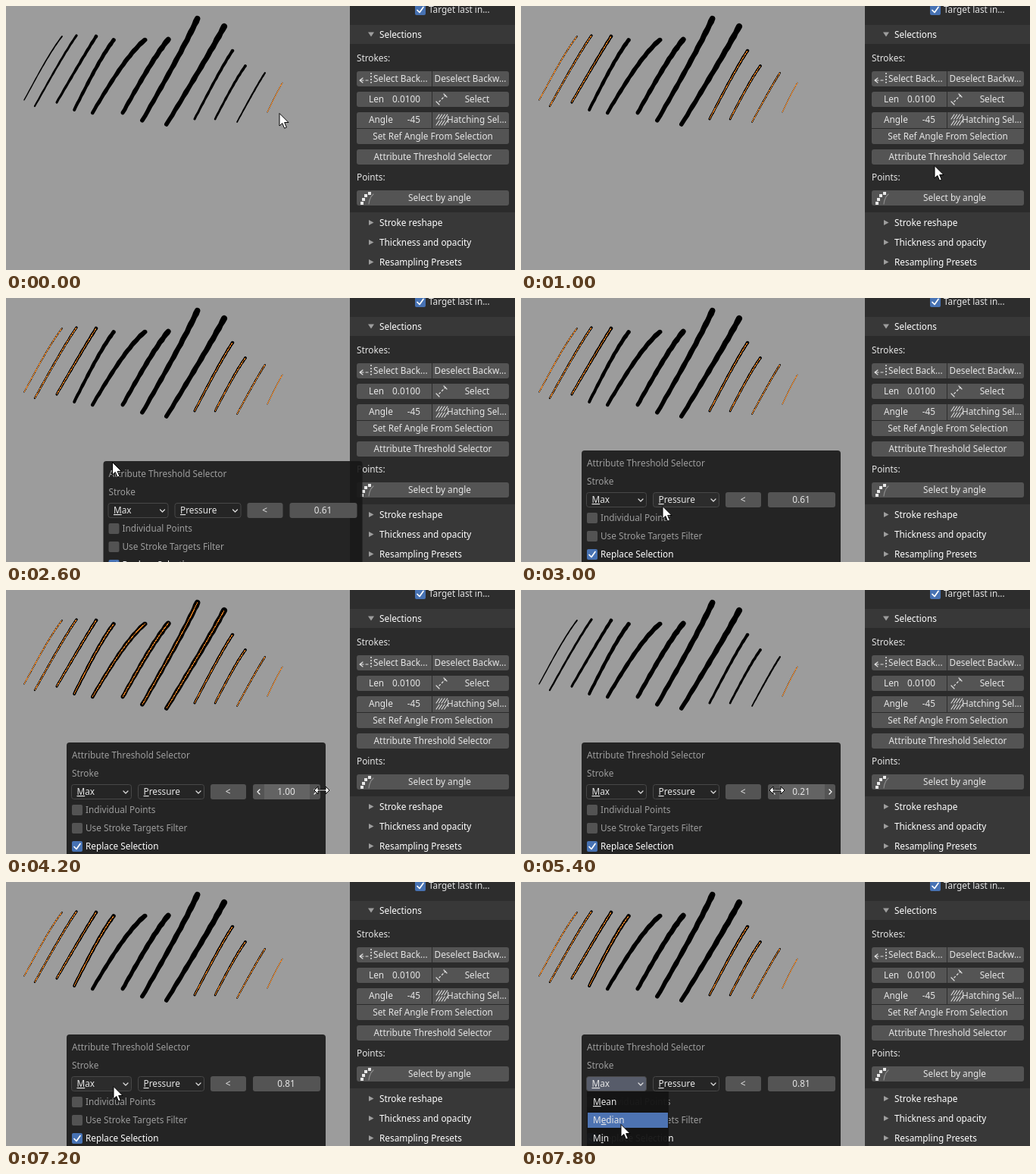
An HTML page that plays this animation: 672x348 px, repeating every 8 s.

```html
<!DOCTYPE html>
<html lang="en">
<head>
<meta charset="utf-8">
<style>
html, body { margin: 0; width: 100%; height: 100%; overflow: hidden; background: #9c9c9c; }
svg { display: block; width: 672px; height: 348px; font: 11.8px "Noto Sans", "Open Sans", sans-serif; }
text { white-space: pre; }
.u { text-decoration: underline; }
.ln { fill: none; stroke-linecap: round; stroke-linejoin: round; }
.sel { fill: none; stroke: #f08420; stroke-width: 1; shape-rendering: crispEdges; }
</style>
</head>
<body>
<svg id="stage" viewBox="0 0 672 348"></svg>
<script>
const STEP = 200, LOOP = 8000;
const GREY = '#545454', HOVER = '#656565', DARK = '#252525', BLUE = '#4772b3';
const TEXT = '#e6e6e6', DIM = '#9d9d9d';
const $ = id => document.getElementById(id);

// Key points of the motion: step, then values
const cursorKeys = [
  [0, 361, 142], [3, 540, 202], [5, 546, 211], [6, 548, 222], [7, 525, 206],
  [10, 189, 231], [12, 189, 231], [14, 92, 203], [15, 187, 275],
  [18, 378, 264], [34, 398, 264], [36, 142, 270], [39, 132, 320]
];
const valueKeys = [[18, .61], [21, 1], [27, .21], [34, .81]];

const clamp = (v, lo, hi) => Math.min(hi, Math.max(lo, v));
const ease = p => p * p * (3 - 2 * p);

function track(keys, step) {
  const s = clamp(step, keys[0][0], keys[keys.length - 1][0]);
  const i = Math.max(1, keys.findIndex(k => k[0] >= s));
  const a = keys[i - 1], b = keys[i], p = ease((s - a[0]) / (b[0] - a[0]));
  return a.slice(1).map((v, n) => v + (b[n + 1] - v) * p);
}

// Markup helpers
const shape = (d, fill) => `<path d="${d}" fill="${fill}"/>`;
const line = (d, color = '#e0e0e0', w = 1.2, extra = '') =>
  `<path class="ln" d="${d}" stroke="${color}" stroke-width="${w}" ${extra}/>`;
const text = (x, y, s, fill = TEXT, anchor = 'start', id = '') =>
  `<text ${id && `id="${id}"`} x="${x}" y="${y}" fill="${fill}" text-anchor="${anchor}">${s}</text>`;
const mid = (x, y, s, id) => text(x, y, s, TEXT, 'middle', id);
const key = (s, n = 0) => `${s.slice(0, n)}<tspan class="u">${s[n]}</tspan>${s.slice(n + 1)}`;

// Rounded box; sides names the corners to round: l, r, t, b or all
function box(x, y, w, h, fill, { id = '', sides = 'lr', r = 3, edge = '' } = {}) {
  const round = names => [...names].some(n => sides.includes(n)) ? r : 0;
  const [a, b, c, d] = ['lp', 'rq', 'rs', 'lt'].map(round);
  return `<path ${id && `id="${id}"`} fill="${fill}" ${edge && `stroke="${edge}"`} d="M${x + a} ${y}h${w - a - b}q${b} 0 ${b} ${b}v${h - b - c}` +
    `q0 ${c} ${-c} ${c}h${c + d - w}q${-d} 0 ${-d} ${-d}v${a + d - h}q0 ${-a} ${a} ${-a}z"/>`;
}
const pair = (y, h = 20, left = 'l', right = 'r') =>
  box(463, y, 99, h, GREY, { sides: left }) + box(563, y, 101, h, GREY, { sides: right });
const wide = (y, s, opt) => box(463, y, 201, 20, GREY, opt) + mid(563.5, y + 14, s);
const field = (y, name, value) => text(479, y, name) + text(547, y, value, TEXT, 'end');
const check = (x, y, on) => box(x, y, 14, 14, on ? BLUE : '#535353', { r: 2 }) +
  (on ? line(`M${x + 3} ${y + 7.5}l3 3 5-7`, '#fff', 1.7) : '');

// Brush strokes: top and bottom end of each
const ends = [
  [74, 40, 24, 124], [93, 39, 38, 132], [119, 40, 67, 127], [142, 45, 90, 137],
  [184, 44, 114, 141], [215, 43, 154, 141], [253, 16, 180, 151], [288, 27, 212, 156],
  [299, 59, 249, 149], [316, 79, 276, 149], [342, 88, 305, 153], [365, 101, 345, 140]
];

// Pressure builds over the first eight strokes, then falls away
const pressure = i => i < 8 ? .27 + .71 * Math.sin(Math.PI / 2 * i / 7) : .55 - .05 * (i - 8) ** 2;
const bend = i => 3 - .2 * i + 6 * Math.sin(1.257 * (i - 2.75)) * Math.exp(-(((i - 5) / 3) ** 2));

function brush([x1, y1, x2, y2], i) {
  const dx = x2 - x1, dy = y2 - y1, len = Math.hypot(dx, dy);
  const nx = -dy / len, ny = dx / len;
  const r1 = Math.max(.5, 4 * pressure(i) ** 1.1), r2 = Math.max(.5, r1 * .72);
  const at = (p, b) => [x1 + dx * p + nx * b, y1 + dy * p + ny * b];
  const pts = [[x1, y1], at(.25, bend(i)), at(.62, bend(i) / 2), [x2, y2]];
  const left = [], right = [], n = 24;
  for (let k = 0; k <= n; k++) {
    const t = k / n, q = 1 - t, w = [q * q * q, 3 * q * q * t, 3 * q * t * t, t * t * t];
    const [x, y] = [0, 1].map(c => pts.reduce((s, p, j) => s + p[c] * w[j], 0));
    const r = r1 + (r2 - r1) * t;
    const side = (sign, f) => {
      const d = sign * r * (1 + .09 * Math.sin(k * f + i));
      return `${(x + nx * d).toFixed(2)} ${(y + ny * d).toFixed(2)}`;
    };
    left.push(side(1, 1.9));
    right.unshift(side(-1, 2.3));
  }
  return shape(`M${left.join('L')}A${r2} ${r2} 0 0 0 ${right.join('L')}A${r1} ${r1} 0 0 0 ${left[0]}z`, '#000') +
    `<path id="sel${i}" class="sel" d="M${pts[0]}C${pts.slice(1).join(' ')}"/>`;
}

function panel() {
  let hatch = '';
  for (let k = 0; k < 4; k++) hatch += `M${568 + k * 3.6} 149l4-6M${568 + k * 3.6} 157l4-6`;
  const closed = ['Stroke reshape', 'Thickness and opacity', 'Resampling Presets'];
  return shape('M454 0H672V348H454z', '#383838') +
    shape('M454 0H672V25H454z', '#2d2d2d') +
    shape('M454 50H672V272H454z', '#2b2b2b') +
    check(540, -2, true) + text(558, 9, 'Target last in...') +
    shape('M478 34.500h8l-4 6z', DIM) + text(493, 42, 'Selections', '#fff') +
    text(463, 73, 'Strokes:') +
    pair(86) + text(485, 100, 'Select Back...') + mid(613, 100, 'Deselect Backw...') +
    line('M471 95l-4 3 4 3M468 98h4M475 98h3') + line('M482 89v13', '#e0e0e0', 2, 'stroke-dasharray="0.1 3.8"') +
    pair(113) + field(127, 'Len', '0.0100') + mid(622, 127, 'Select') +
    line('M568 126l4 4M578 116l4 4') + line('M572 126l8-8', '#e0e0e0', 1.3, 'stroke-dasharray="2 3"') +
    pair(140, 21, 'p', 'q') + field(154, 'Angle', '-45') + text(582, 154, 'Hatching Sel...') +
    line(hatch, '#e0e0e0', 1.1) +
    wide(162, 'Set Ref Angle From Selection', { sides: 'st' }) +
    wide(189, 'Attribute Threshold Selector', { id: 'attr' }) +
    text(463, 230, 'Points:') +
    box(463, 243, 201, 20, GREY) + mid(572.5, 257, 'Select by angle') +
    line('M485 248q-5 4-6 13', '#8c8c8c') +
    shape('M478 245h4v4h-4zM473 248h4v4h-4zM470 253h4v4h-4zM468 258h4v4h-4z', '#e8e8e8') +
    closed.map((s, i) => shape(`M479 ${282 + 26 * i}l6.500 3.500-6.500 3.500z`, DIM) + text(493, 290 + 26 * i, s, '#fff')).join('');
}

const dropdown = (x, w, s, id) => box(x + .5, 55.5, w - 1, 19, DARK, { id, edge: '#484848' }) +
  text(x + 7.5, 69, key(s)) + line(`M${x + w - 11} 64l3 3 3-3`);

function popup() {
  const options = ['Individual Points', 'Use Stroke Targets Filter', 'Replace Selection'];
  return `<g id="popup">` +
    box(0, 0, 342, 170, 'rgba(24,24,24,.9)', { r: 4 }) +
    text(7, 20.5, 'Attribute Threshold Selector', DIM) + text(7, 45, 'Stroke', DIM) +
    dropdown(6, 80, 'Max', 'stat') + dropdown(94, 88, 'Pressure', 'attrib') +
    box(190, 55, 47, 20, GREY, { id: 'less' }) + mid(213, 69, '&lt;') +
    box(246, 55, 89, 20, GREY) +
    `<g id="hot">` + shape('M261 55h60v20h-60z', '#636363') + line('M255 62l-3 3 3 3M327 62l3 3-3 3', '#fff') + `</g>` +
    mid(290, 69, '', 'value') +
    options.map((s, i) => check(7, 82 + 24 * i, i === 2) + text(25, 93 + 24 * i, s, i === 2 ? '#fff' : DIM)).join('') + `</g>`;
}

const menu = () => `<g id="menu">` + box(87, 276, 108, 80, 'rgba(20,20,20,.95)', { r: 0 }) +
  `<rect id="pick" x="88" width="106" height="20" fill="#4d73b2"/>` +
  [key('Mean'), key('Median', 1), key('Min', 1)].map((s, i) => text(95, 294 + 24 * i, s)).join('') + `</g>`;

const pointers =
  `<path id="arrow" d="M0-.5V16L3.800 12.500 6.600 19.200 9.400 18 6.700 11.500H12z" fill="#fff" stroke="#000"/>` +
  `<path id="slide" d="M-10 0l5-5v4H5v-4l5 5-5 5V1H-5v4z" fill="#fff" stroke="#000"/>`;

$('stage').innerHTML = shape('M0 0H672V348H0z', '#9c9c9c') +
  ends.map(brush).join('') + panel() + popup() + menu() + pointers;

const show = (id, on) => $(id).setAttribute('display', on ? 'inline' : 'none');
const fill = (id, color) => $(id).setAttribute('fill', color);
const move = (id, x, y) => $(id).setAttribute('transform', `translate(${x} ${y})`);

function render(ms) {
  const s = Math.floor((ms % LOOP) / STEP);
  const value = track(valueKeys, s)[0];
  const limit = s < 4 ? .21 : value;
  const drag = s >= 18 && s <= 34;
  let [x, y] = track(cursorKeys, s);
  if (drag) x = 317 + 100 * value;

  // The popup is dragged along with the cursor for a moment
  const [px, py] = track(cursorKeys, clamp(s, 12, 14)).map((v, n) => v - (n ? 2 : 12));
  const over = (l, t, w) => x >= l && x < l + w && y >= t && y < t + 20;
  const inRow = (l, w) => s >= 10 && over(px + l, py + 55, w);
  const open = s >= 37, onField = drag || inRow(246, 89);

  ends.forEach((_, i) => show('sel' + i, pressure(i) < limit));
  fill('attr', over(463, 189, 201) ? HOVER : GREY);

  show('popup', s >= 10);
  move('popup', px, py);
  $('value').textContent = value.toFixed(2);
  show('hot', onField);
  fill('less', inRow(190, 47) ? HOVER : GREY);
  fill('stat', open ? '#575c6a' : inRow(6, 80) ? '#2c2c2c' : DARK);
  fill('attrib', inRow(94, 88) ? '#2c2c2c' : DARK);

  show('menu', open);
  $('pick').setAttribute('y', 280 + 24 * Math.floor((y - 278) / 24));

  show('arrow', !onField);
  show('slide', onField);
  move(onField ? 'slide' : 'arrow', x, y);
}

const start = performance.now();
function tick() {
  render(performance.now() - start);
  requestAnimationFrame(tick);
}
tick();
</script>
</body>
</html>
```
